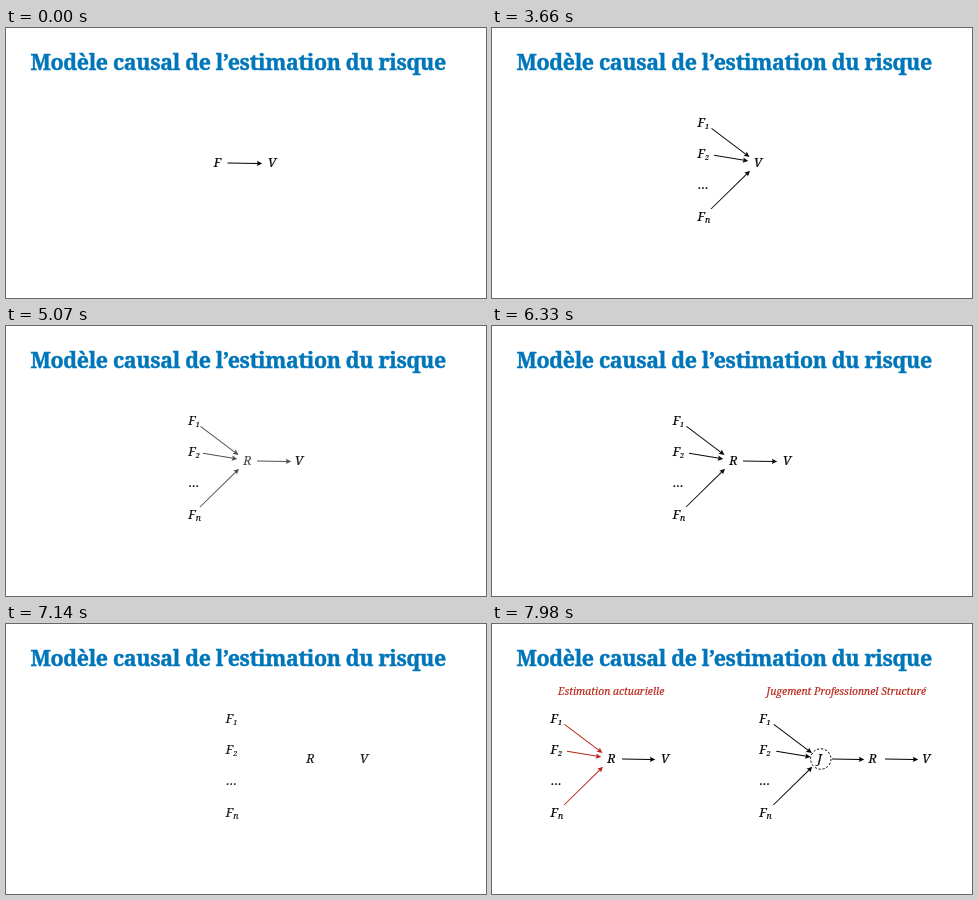
An HTML page that plays this animation: 480x270 px, repeating every 8 s.

```html
<!DOCTYPE html>
<html lang="fr">
<head>
<meta charset="utf-8">
<title>Modèle causal</title>
<style>
html, body { margin: 0; width: 100%; height: 100%; overflow: hidden; background: #fff; }
svg { display: block; width: 100vw; height: 100vh; }
text { font: italic 12.5px "Noto Serif", serif; stroke: #000; stroke-width: .2px; }
.title { font: bold 21.4px "Noto Serif", serif; letter-spacing: -.35px; fill: #0076ba; stroke: #0076ba; stroke-width: .45px; }
.head { font-size: 10.3px; fill: #b8271a; stroke: #b8271a; }
.arrow { fill: #000; stroke: #000; }
.red .arrow { fill: #b8271a; stroke: #b8271a; }
</style>
</head>
<body>
<svg id="stage" viewBox="0 0 480 270"></svg>
<script>
const LOOP = 8000, STEP = 30, MOVE = 1770;

const label = (x, y, s, cls = '') => `<text class="${cls}" x="${x}" y="${y}">${s}</text>`;
const group = (id, body) => `<g id="${id}">${body}</g>`;

function arrow(x1, y1, x2, y2) {
  const len = Math.hypot(x2 - x1, y2 - y1);
  const angle = Math.atan2(y2 - y1, x2 - x1) * 180 / Math.PI;
  return `<g class="arrow" transform="translate(${x1} ${y1}) rotate(${angle})">
    <path d="M0 0H${len - 4}"/>
    <path stroke="none" d="M${len} 0l-5.5-2.7 1 2.7-1 2.7z"/></g>`;
}

const factor = (y, sub, size) =>
  `<text x="205.6" y="${y}">F<tspan font-size="${size}" dy="1.3">${sub}</tspan></text>`;
const factors = factor(99.3, 1, 7.3) + factor(130.3, 2, 7.3) +
  label(206, 161.3, '…') + factor(193.3, 'n', 8.7);

// Three arrows from the factors, shifted by dx
const fan = dx => arrow(219.5 + dx, 100.3, 257.5 + dx, 129) +
  arrow(222 + dx, 127.2, 256.3 + dx, 133) + arrow(219 + dx, 181, 258 + dx, 142.8);
const link = (x1, x2) => arrow(x1, 135, x2, 135.5);

stage.innerHTML = label(24.5, 42, 'Modèle causal de l’estimation du risque', 'title') +
  group('single', label(207.8, 139.4, 'F') + link(221.5, 256.3)) +
  group('fan1', fan(0)) +
  group('fan2', fan(-25) + link(251, 285.3)) +
  group('left', label(66, 71, 'Estimation actuarielle', 'head') +
    `<g transform="translate(-147 0)">${factors}</g>` +
    `<g class="red">${fan(-147)}</g>` + link(130, 163.3) +
    label(115.2, 139.4, 'R') + label(168.7, 139.4, 'V')) +
  group('right', label(274.5, 71, 'Jugement Professionnel Structuré', 'head') +
    fan(62.3) + link(340, 372.3) + link(393, 426.3) + label(325.5, 139.4, 'J') +
    '<circle cx="328.8" cy="135" r="10.2" fill="none" stroke="#000" stroke-dasharray="2.2 1.8"/>') +
  group('factorSet', factors) +
  group('risk', label(237.2, 139.4, 'R')) +
  group('value', label(261.7, 139.4, 'V'));

const ramp = (t, a, b) => Math.min(1, Math.max(0, (t - a) / (b - a)));
const ease = u => u < .5 ? 2 * u * u : 1 - 2 * (1 - u) ** 2;
const fadeOut = u => 1 - ramp(u, 0, .45);
const fadeIn = u => ramp(u, .52, .95);
const dip = u => 1 - .4 * u * (1 - u);

function show(el, opacity, dx = 0) {
  el.setAttribute('opacity', opacity);
  el.setAttribute('transform', `translate(${dx} 0)`);
}

function draw(now) {
  const t = Math.floor(now % LOOP / STEP) * STEP;
  const u = ramp(t, 3630, 3630 + MOVE), v = ramp(t, 6300, 6300 + MOVE);
  const p = ease(u), q = ease(v), appear = ramp(t, 2175, 2700);
  const solid = dip(u) * dip(v);

  show(single, 1 - ramp(t, 870, 1440));
  show(fan1, appear * fadeOut(u));
  show(fan2, fadeIn(u) * fadeOut(v));
  show(left, fadeIn(v));
  show(right, fadeIn(v));
  show(factorSet, appear * solid, -25 * p + 87 * q);
  show(risk, fadeIn(u) * dip(v), 140 * q);
  show(value, solid, 29 * p + 140 * q);
  requestAnimationFrame(() => draw(performance.now()));
}
draw(0);
</script>
</body>
</html>
```
